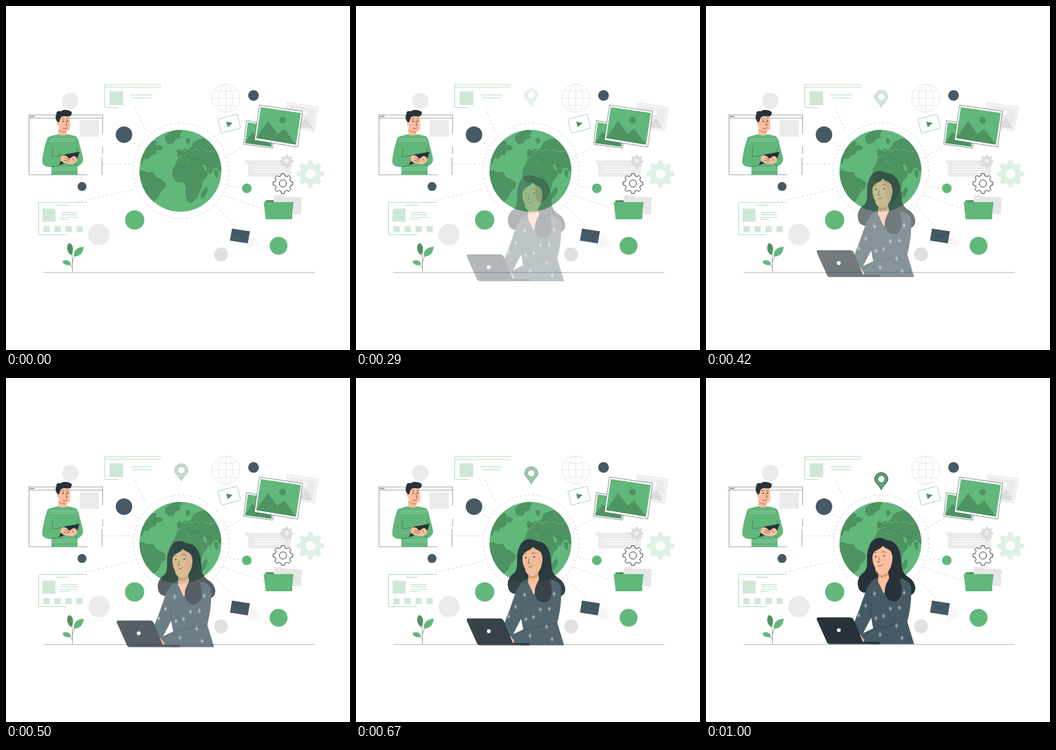
Recreate the animation shown at these times as an HTML page. Size 500 by 500 pixels, loop 1040 ms.

```html
<!DOCTYPE html>
<html lang="en">
<head>
<meta charset="utf-8">
<title>Connected world</title>
<style>
html, body { margin: 0; width: 100%; height: 100%; overflow: hidden; background: #fff; }
svg { display: block; width: 100%; height: 100%; }
.green { fill: #62b77b; } .land { fill: #4e9362; } .mint { fill: #cfe8d6; }
.navy { fill: #455a64; } .ink { fill: #263238; } .skin { fill: #ffbe9d; }
.pale { fill: #ebebeb; } .grey { fill: #e0e0e0; }
.line { fill: none; stroke: #263238; stroke-width: .6; stroke-linecap: round; stroke-linejoin: round; }
.mintline { fill: none; stroke: #a6d7b4; stroke-width: .8; }
.dash { fill: none; stroke: #b5bbbe; stroke-width: .6; stroke-dasharray: 3 3.2; }
.rim { stroke: #3b6f4a; stroke-width: .4; }
</style>
</head>
<body>
<svg viewBox="0 0 500 500">
  <defs>
    <clipPath id="ball"><circle cx="253.5" cy="239.5" r="59.5"/></clipPath>
  </defs>

  <path class="line" d="M55 387.3H448" stroke-opacity=".6"/>

  <!-- cards -->
  <path class="mintline" d="M226 114.5H143.5V147.5H163M143.5 118H225M181 129.2H213M184 133.5H211"/>
  <path class="mint" d="M150.5 124h20v20h-20z"/>
  <path class="mintline" d="M118 285.5H47.5V332.5H88M73 289.5H91M80 300.5H103M80 303.5H103M80 307.2H104M78 310.2H92"/>
  <path class="mint" d="M53 294.5h19v19h-19zM54.5 320h9v8.8h-9zM70.500 320h9v8.8h-9zM86.5 320h9v8.8h-9zM102.5 320h9v8.8h-9z"/>

  <!-- window -->
  <path class="line" d="M33.5 158.3H140.5V185M140.5 205V215M139.5 220V245M33.5 158.3V245.300H118M33.5 163H140" stroke-opacity=".7"/>
  <g class="ink"><circle cx="35.7" cy="160.6" r=".8"/><circle cx="38" cy="160.6" r=".8"/><circle cx="40.4" cy="160.6" r=".8"/></g>
  <path class="pale" d="M107 166h28v24h-28z"/>

  <!-- man -->
  <g>
    <path class="skin" d="M77 164C77 159 92 157 93 163L93.5 174Q94 181.500 88 182V188Q82 191 76 187L76.500 174C72 172 73 165 77 168Z"/>
    <path class="ink" d="M76 169C72 167 71 160 73.500 157C72 153 77 152 80 153C83 150 91 150.500 95.500 154C96 157 94.500 160 92 160.500C88 161 84 159 81 161C78 163 78.500 167 77 169Z"/>
    <path d="M76.300 179Q82 183 88 181.500V184Q82 185 76.300 181Z" fill="#e59a78"/>
    <g class="ink"><circle cx="83" cy="167.500" r=".9"/><circle cx="89.500" cy="167" r=".9"/></g>
    <path class="line" d="M81.500 164.500l3-.8M88 164l2.500-.3M87 167.500l2 6h-2M83 178q4 1 6-1"/>
    <path class="green" d="M75 186.500Q82 190 90 186.500L101 189Q105 191 107 202L112 221Q113 229 104 233V245.500H66V234Q53 234 52.500 226Q54 210 60 192Q61 190 65 189Z"/>
    <path fill="none" stroke="#9ad0aa" stroke-width=".8" d="M65 193.500H102M64 196.500H102M66 235.500H104M66 238.500H104"/>
    <path class="line" stroke-opacity=".65" d="M68 207L67 219Q74 219 81 217M66 234L83 230M104 232L99 229M103 207L104 215"/>
    <path class="ink" d="M84 216L107 212L103 223L77 231Z"/>
    <path class="skin" d="M80 219Q84 215.500 88 218L92 222L98 218Q103 218 103.500 224Q102 229 96 230L88 229Q83 228 79.500 225Z"/>
    <path class="line" stroke-width=".4" d="M86 221l7 3M84 224l7 2M96 221l3 4"/>
  </g>

  <!-- plant -->
  <path class="line" d="M96.500 386Q97 365 95 349M96.500 373Q98 363 109 352M96 380Q94 374 85 372" stroke-opacity=".7"/>
  <path class="land" d="M95 362C87 358 88 346 92 344.500C98 346 99 355 95 362Z"/>
  <path class="green" d="M98.500 364C98 355 104 350 113 350C112 359 107 365 98.500 364ZM94.500 376C88 378 82 375 82.500 370.500C88 368 94 370 94.500 376Z"/>

  <!-- wire globe -->
  <g fill="none" stroke="#e2e2e2" stroke-width=".8">
    <circle cx="319.500" cy="134" r="20.500"/><ellipse cx="319.500" cy="134" rx="10.500" ry="20.500"/>
    <path d="M319.500 113.500V154.500M299 134H340M303 122Q319.500 126 336 122M303 146Q319.500 142 336 146"/>
  </g>

  <!-- video card -->
  <g transform="rotate(-15 324.500 171)">
    <rect x="310" y="160.500" width="29" height="21" rx="1" fill="#fff" stroke="#9bd2ac" stroke-width=".8"/>
    <path class="land" d="M321 167l8.500 4.200l-8.500 4.200z"/>
  </g>

  <!-- photos -->
  <path d="M409 140L454 147L448 182L403 175Z" fill="#f3f3f3" stroke="#dcdcdc" stroke-width=".6"/>
  <path class="pale" d="M412 144L450 150L445 178L408 172Z"/>
  <path d="M420 175L437 163L446 178.500Z" fill="#dcdcdc"/><circle cx="434" cy="155" r="3.500" fill="#fafafa"/>
  <path d="M349.500 166.500L392 173.500L387.500 206.500L345.500 201Z" fill="#fff" stroke="#263238" stroke-width=".5"/>
  <path class="green" d="M351.500 169L390 175.500L386 204.500L347.500 199.500Z"/>
  <path class="land" d="M347.500 199L358 183L367 192L376 185L386 204.500Z"/>
  <path d="M368.500 144L431 153L424 205L361 195Z" fill="#fff" stroke="#263238" stroke-width=".5"/>
  <path class="green" d="M370.500 147L428.500 155.500L421.500 201.500L363.500 192Z"/>
  <path class="land" d="M363.500 192L381 167L395 186L404 178L421.500 201.500Z"/><circle class="land" cx="402" cy="166" r="4.800"/>

  <!-- speech bubble, folder, envelope -->
  <path class="pale" d="M347 224.500H412Q414 224.500 414 227V246Q414 248 411 248H355Q352 248 352 245V232Z"/>
  <path d="M359 233.800H408M359 237.500H406M359 241.300H405" stroke="#fff" stroke-width="1"/>
  <path d="M389 277L391 274.500L401 275.500L403 277L430 278L428.500 303L389 301Z" fill="#e6e6e6"/>
  <path class="land" d="M377 284V282.500L388 282L390 285H416V309H378Z"/>
  <path class="green" d="M374.500 285H418L415 310H377.500Z"/>
  <path d="M347 338L363 334L368 348L351 353Z" fill="#f7f7f7"/>
  <path class="navy" d="M328.500 323.500L354.500 327.500L351.500 345L325.500 341Z"/>
  <path class="line" stroke-opacity=".45" d="M329 324L339.500 336L354 328"/>

  <g id="gears"></g>
  <g id="badges"></g>

  <!-- earth -->
  <circle class="dash" cx="254.500" cy="239.500" r="69.500"/>
  <path class="dash" d="M188 148L203 182M185 199L196 205M140 229.500H185M103 285L187 266M317 220L345 204M324 262L343 264.500M316 275L371 294M306 291L334 321"/>
  <circle class="green" cx="253.500" cy="239.500" r="59.500"/>
  <g class="land rim" clip-path="url(#ball)">
    <path d="M232 189L240 183L250 180L256 182L252 187L253 191L246 194L243 199L236 200L232 196Z"/>
    <path d="M196 224L198 212L208 201L214 196L219 198L216 203L222 202L228 205L225 209L219 209L217 215L210 217L207 222L201 221L197 230Z"/>
    <path d="M192 241L199 239L205 242L214 242L218 249L225 252L232 257L231 264L225 269L221 278L215 284L214 291L206 284L200 270L198 258L193 252Z"/>
    <path d="M261 194L265 192L268 196L264 201ZM248 211L252 208L255 211L251 216ZM272 199L279 195L288 193L300 199L312 216L316 240L310 240L306 234L302 236L300 232L296 235L291 231L286 230L281 226L276 228L271 222L265 221L260 216L254 218L250 219L249 215L256 211L260 208L265 209L270 205Z"/>
    <path d="M250 222L258 218L266 219L270 222L278 223L285 230L288 238L293 242L292 248L286 254L284 262L281 270L277 279L269 286L264 284L261 273L262 263L258 256L247 255L242 247L243 237L247 230Z"/>
    <path d="M291 263L293 267L289 277L284 280L284 272ZM291 231L298 232L301 237L297 244L293 241ZM303 238L308 240L307 250L304 246Z"/>
  </g>
  <path d="M258 212L265 209L271 211L275 208L281 211M260 224L267 230M285 208L295 212L303 211" fill="none" stroke="#62b77b" stroke-width="1"/>

  <!-- map pin at rest -->
  <g id="pin">
    <path fill="#57a870" stroke="#263238" stroke-width=".9" fill-rule="evenodd" d="M254.800 162.200C251 155 245.300 152 245.300 147A9.500 9.500 0 0 1 264.300 147C264.300 152 258.500 155 254.800 162.200ZM259.800 147A5 5 0 1 0 249.800 147A5 5 0 1 0 259.800 147Z"/>
    <circle cx="254.800" cy="147" r="4.700" fill="#fff"/>
  </g>

  <!-- woman at rest -->
  <g id="woman">
    <path class="ink" d="M256 233C247 231 238 237 237 247C232 259 237 272 231 281C225 285 219 292 221 302C222 312 232 315 239 309L290 317C301 318 307 309 303 300C300 290 291 290 287 282C283 275 285 269 283 260C282 248 275 236 264 236Z"/>
    <path class="navy" fill-rule="evenodd" d="M249 290L239 296C231 308 226 331 219 346L214.500 358L225 377L222 384L240 386.800H302.500L292.500 354C297 338 299 320 298 303Q295 293 281 291L262 300ZM228 371L240 348L243 364Z"/>
    <path class="skin" d="M251 276L250 296Q254 303 258 313Q265 308 268 298L264 280Z"/>
    <path fill="#e59a78" d="M251 284Q258 289 265 281L264 287Q257 292 251 289Z"/>
    <path class="skin" d="M242 257C243 250 252 251 257 244C262 249 270 249 271 256C273 269 266 286 256 286.500C246 286 241 270 242 257Z"/>
    <path class="ink" d="M257 242C252 248 246 249 243 255C240 263 243 271 246 276C247 286 241 296 234 305C225 310 220 302 224 293L234 282C237 271 231 258 237 246C241 234 253 231 260 238Z"/>
    <path class="ink" d="M257 241C262 248 269 248 270.500 257C273 266 267 274 269 282C268 292 259 299 260 311C261 320 268 327 277 324C285 320 286 308 283 298C281 287 285 277 283 266C283 248 273 235 262 236Z"/>
    <path class="line" d="M243.500 254.500q2-2 4-1M256 253q3-1.500 5 .3M252 261l-2 6.500h2.500M251 273q3 1.500 6-2"/>
    <g class="ink"><circle cx="246.800" cy="259.500" r="1.100"/><circle cx="259" cy="258.500" r="1.100"/></g>
    <path class="line" stroke-opacity=".7" d="M240 328L240 348L228 371M292 354Q280 357 267 360L243 365L228 376M267 360L276 352"/>
    <path id="stars" fill="none" stroke="#cfd9dc" stroke-width=".55"/>
    <path class="skin" d="M220 370L225 374L230 381L228 385.500L222 381Z"/>
    <path class="ink" d="M163 348H209Q213 348 214.500 351L228 383.500H250Q253 384 253 385.500L252 386.800H180Q177 386.800 176 384.500L161 351Q160.500 348.300 163 348Z"/>
    <path d="M165 349.500L180 385.500H229" fill="none" stroke="#455a64" stroke-width=".4"/>
    <circle cx="193" cy="366.500" r="2.800" fill="#fff"/>
  </g>
</svg>
<script>
const LOOP = 1040, RATE = 24, RISE = 20;
const byId = id => document.getElementById(id);
const woman = byId("woman"), pin = byId("pin");

// Toothed wheel with a round hole.
function gear(x, y, outer, inner, hole, style) {
  const teeth = 8, points = [];
  for (let i = 0; i < teeth; i++) {
    for (const [shift, r] of [[-.3, inner], [-.19, outer], [.19, outer], [.3, inner]]) {
      const a = (i + shift) / teeth * 2 * Math.PI;
      points.push(`${(x + r * Math.cos(a)).toFixed(2)} ${(y + r * Math.sin(a)).toFixed(2)}`);
    }
  }
  const ring = `M${x + hole} ${y}a${hole} ${hole} 0 1 0 ${-2 * hole} 0a${hole} ${hole} 0 1 0 ${2 * hole} 0z`;
  return `<path ${style} fill-rule="evenodd" stroke-linejoin="round" d="M${points.join("L")}Z${ring}"/>`;
}

byId("gears").innerHTML =
  gear(408, 226, 10, 7.6, 3.2, 'fill="#dcdcdc"') +
  gear(442.5, 244, 20, 15.5, 7, 'fill="#dff0e4"') +
  gear(402.5, 258, 14.5, 11.6, 5.2, 'fill="#fff" stroke="#263238" stroke-width=".9"');

byId("badges").innerHTML = [
  [93.5, 138, 12, "pale"], [171.5, 187, 12, "navy"], [187, 311, 14, "green"],
  [110.5, 262.3, 6.5, "navy"], [135, 332.3, 15.5, "pale"], [350, 265, 7, "green"],
  [396.2, 348.5, 13, "green"], [312.7, 361, 10.2, "grey"], [359.8, 130, 7.8, "navy"]
].map(([x, y, r, tone]) => `<circle class="${tone}" cx="${x}" cy="${y}" r="${r}"/>`).join("");

byId("stars").setAttribute("d", [
  [232, 331], [245, 313.5], [258, 346], [277, 360], [222, 345], [281, 334],
  [285, 378], [253, 373], [288, 312], [247, 349], [268, 335]
].map(([x, y]) => `M${x} ${y - 4}v8M${x - 2.5} ${y}h5M${x - 1.6} ${y - 2}l3.2 4M${x + 1.6} ${y - 2}l-3.2 4`).join(""));

// Same curve as cubic-bezier(x1, 0, x2, 1).
const easing = (x1, x2) => x => {
  let low = 0, high = 1;
  for (let i = 0; i < 24; i++) {
    const s = (low + high) / 2;
    const at = 3 * x1 * s * (1 - s) ** 2 + 3 * x2 * s * s * (1 - s) + s ** 3;
    if (at < x) low = s; else high = s;
  }
  return high * high * (3 - 2 * high);
};
const settle = easing(.4, .2), gather = easing(.4, .9);

function enter(node, progress, distance) {
  node.setAttribute("opacity", progress);
  node.setAttribute("transform", `translate(0 ${distance * (1 - progress)})`);
}

function draw(ms) {
  const t = ms % LOOP;
  const x = Math.min(RATE, Math.floor((t + 5) * RATE / 1000)) / RATE;
  enter(woman, settle(x), RISE);
  enter(pin, gather(x), -RISE);
}

const start = performance.now();
function tick() {
  draw(performance.now() - start);
  requestAnimationFrame(tick);
}
tick();
</script>
</body>
</html>
```
